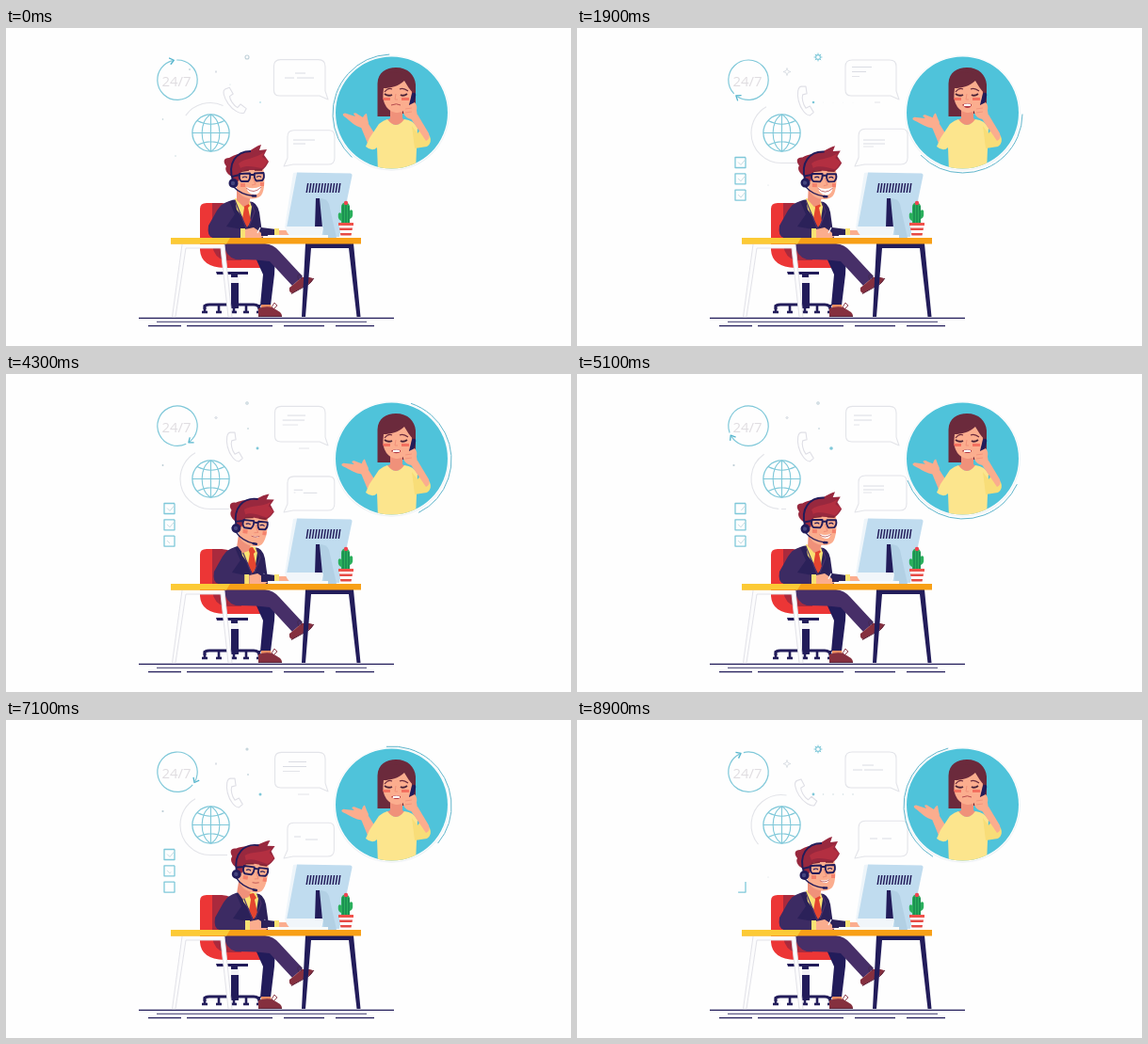
Recreate the animation shown at these times as an HTML page with a canvas. Size 600 by 338 pixels, loop 9000 ms.

```html
<!DOCTYPE html>
<html lang="en">
<head>
<meta charset="utf-8">
<title>Support desk</title>
<style>
html, body { margin: 0; width: 100%; height: 100%; overflow: hidden; background: #fefefe; }
canvas { display: block; width: 600px; height: 338px; }
</style>
</head>
<body>
<canvas id="stage" width="600" height="338"></canvas>
<script>
const ctx = document.getElementById('stage').getContext('2d');
const CYCLE = 3000, STEP = 100, TAU = Math.PI * 2;
const NAVY = '#221c5a', SUIT = '#2b2159', PANTS = '#472f68', CYAN = '#7fc8d9', GREY = '#e3e4e9';
const SKIN = '#fbad8e', SHADE = '#f0917a', RED = '#ec3636', WINE = '#aa2a3d', HAIR = '#98283e', BROWN = '#6b2a3c', YELLOW = '#fce58d';
const TIMES = [0, 500, 1100, 1900, 2100, 2900, CYCLE];
let p = 0;

const rad = deg => deg * Math.PI / 180;
const clamp = v => Math.max(0, Math.min(1, v));

// one value per key time, wrapping at the end of the cycle
function pose(...v) {
  let i = 0;
  while (p >= TIMES[i + 1]) i++;
  const k = (p - TIMES[i]) / (TIMES[i + 1] - TIMES[i]);
  const s = k * k * (3 - 2 * k);
  return v[i] + (v[(i + 1) % 6] - v[i]) * s;
}

function fill(d, color) {
  ctx.fillStyle = color;
  ctx.fill(new Path2D(d));
}

function line(d, color, width = 1, cap = 'butt') {
  ctx.strokeStyle = color;
  ctx.lineWidth = width;
  ctx.lineCap = cap;
  ctx.lineJoin = 'round';
  ctx.stroke(new Path2D(d));
}

function trim(d, len, a, b, color, width) {
  if (b <= a) return;
  ctx.setLineDash([0, a * len, (b - a) * len, len * 2]);
  line(d, color, width);
  ctx.setLineDash([]);
}

function disc(x, y, r, color) {
  ctx.beginPath();
  ctx.arc(x, y, r, 0, TAU);
  ctx.fillStyle = color;
  ctx.fill();
}

function arc(x, y, r, a, b, color, width) {
  ctx.beginPath();
  ctx.arc(x, y, r, rad(a), rad(b));
  ctx.strokeStyle = color;
  ctx.lineWidth = width;
  ctx.lineCap = 'butt';
  ctx.stroke();
}

function group(x, y, angle, scale, draw) {
  ctx.save();
  ctx.translate(x, y);
  ctx.rotate(angle);
  ctx.scale(scale, scale);
  draw();
  ctx.restore();
}

function rays(x, y, n, r0, r1, color) {
  for (let i = 0; i < n; i++) {
    const a = TAU * i / n, c = Math.cos(a), s = Math.sin(a);
    line(`M${x + c * r0} ${y + s * r0}L${x + c * r1} ${y + s * r1}`, color, 1);
  }
}

function clock() {
  const a = 256 + p * 0.12;
  arc(182, 55.2, 21.2, a + 12, a + 360, CYAN, 1.2);
  group(182 + 21.2 * Math.cos(rad(a)), 55.2 + 21.2 * Math.sin(rad(a)), rad(a + 90), 1, () =>
    line('M-3 -3.5L1.5 0L-3 3.5', '#55b5cd', 1.3));
  ctx.fillStyle = '#e0dde1';
  ctx.font = '400 15px "Open Sans", "Noto Sans", sans-serif';
  ctx.textAlign = 'center';
  ctx.fillText('24/7', 181, 61.5);
}

function globe() {
  const tail = pose(0, 22, 18, 30, 5, 0);
  arc(217, 111.5, 32, pose(215, 90, 90, 90, 95, 140), pose(295, 300, 240, 240, 235, 280), GREY, 1.1);
  if (tail > 0.5) line(`M217 143.5h${tail}`, GREY, 1.1);
  arc(217.5, 111.5, 19.6, 0, 360, CYAN, 1.3);
  line('M217.5 92V131M198 111.5H237M203 98.5Q217.5 106 232 98.5M203 124.5Q217.5 117 232 124.5', CYAN, 1.1);
  line('M217.5 92C205 98 205 125 217.5 131C230 125 230 98 217.5 92', CYAN, 1.1);
}

function handset() {
  group(243, 77.5, pose(-0.38, 0, 0, 0, 0, -0.33), 1.1, () =>
    line('M-4 -14C-8 -14 -8.5 -7 -7 0C-5 8 0 14 4 14L7.5 11L4 5L0 7C-3 3 -4 -3 -3 -6L1 -7L0 -14Z', '#dfdfe6', 1));
}

function boxes() {
  for (let i = 0; i < 3; i++) {
    const y = 137.5 + i * 17.3, late = p < 60 ? p + CYCLE : p;
    const on = late > CYCLE ? 1 : clamp((p - 100 - i * 250) / 400);
    const off = clamp((late - 2250 - i * 225) / 350);
    if (p < 60 && off >= 1) continue;
    trim(`M179 ${y}H168V${y + 11}H179V${y}`, 44, off, on, CYAN, 1.3);
    const tick = clamp((p - 700 - i * 250) / 300), gone = clamp((p - 2000 - i * 150) / 250);
    trim(`M171 ${y + 5}l3 3l5 -6`, 12, gone, tick, '#c5dce2', 1);
  }
}

function bubbles() {
  group(341, 75, 0, pose(1.01, 0.9, 0.99, 1, 0.99, 1), () => {
    line('M-8 -3H-50Q-56 -3 -56 -9V-34Q-56 -41 -49 -41H-9Q-2 -41 -2 -34V-8L1 1Z', GREY, 1.1);
  });
  const x = pose(296, 297, 294, 292, 294, 293), y = pose(48, 47, 44.5, 41.5, 44, 48);
  const split = pose(11, 0, 6, 0, 0, 10);
  const gap = pose(3, 0, 0, 0, 0, 2);
  line(`M${x + split} ${y}h${pose(11, 24, 19, 21, 19, 12)}`, '#dadce3');
  line(`M${x} ${y + 5}h10m${gap} 0h${pose(18, 5, 15, 5, 9, 20)}`, '#dadce3');
  line(`M${x} ${y + 10}h${pose(0, 9, 18, 8, 6, 0)}`, GREY);
  const under = pose(0, 0, 12, 6, 0, 0);
  if (under > 0.3) line(`M${322 - under} 79h${under}`, GREY);

  group(296, 147, 0, pose(0.98, 1.07, 0.97, 1.02, 1, 1.02), () => {
    line('M3 -9V-32Q3 -39 10 -39H48Q54 -39 54 -33V-9Q54 -2 47 -2H9L-1 0Z', GREY, 1.1);
  });
  const bx = pose(305, 304, 306, 304, 304, 311);
  line(`M${bx} ${pose(119, 117, 124, 119, 119, 126)}h${pose(23, 24, 7, 23, 22, 8)}`, '#dadce3');
  line(`M${bx + pose(0, 0, 12, 0, 0, 13)} ${pose(123, 121, 127, 123, 123, 126)}h${pose(13, 24, 13, 23, 22, 10)}`, '#dadce3');
  line(`M${bx} 126h${pose(0, 11, 0, 11, 9, 0)}`, GREY);
}

function sparks() {
  const s = pose(1, 4, 1, 4, 1.4, 4), q = s / 4;
  line(`M223 ${46.5 - s}l${q} ${s - q}l${s - q} ${q}l${q - s} ${q}l${-q} ${s - q}l${-q} ${q - s}l${q - s} ${-q}l${s - q} ${-q}Z`, '#d3d9e0', 0.8);
  const g = pose(0.2, 0, 0.1, 1, 0.2, 1);
  arc(256, 31, pose(2, 0.8, 1, 2.4, 1.2, 2.4), 0, 360, g > 0.5 ? CYAN : '#bfd0d8', 1.1);
  if (g > 0.3) rays(256, 31, 8, 2.6, 2.6 + 1.8 * g, CYAN);
  disc(pose(270, 270, 270, 251, 270, 251), 79, pose(0.7, 1.2, 1.5, 1.3, 1.8, 1.4), CYAN);
  disc(166.5, 97, pose(0.8, 0.6, 1.1, 0, 1.1, 0), '#bccdd5');
  const k = pose(0, 2.6, 1, 0, 0.8, 0);
  if (k > 0.2) rays(257, 58, 4, 0, k, '#c9d8df');
  const b = pose(0, 1, 0, 0.2, 0, 0.2);
  if (b > 0.3) rays(203, 168, 8, 2.2 * b, 4.5 * b, CYAN);
  else disc(203, 167, b * 3, '#d5dee3');
  disc(195, 44, pose(1.1, 0, 0, 0, 0, 0), '#cbdce2');
  disc(180, 136, pose(0.8, 0, 0, 0, 0, 0), '#cbdce2');
  disc(238, 60, pose(0.6, 1, 0, 0, 0, 0), '#cbdce2');
  const dots = pose(0, 0, 0, 0.4, 0, 1);
  for (let i = 1; i < 5; i++) disc(251 + i * 10.5, 79, 0.8 * dots, '#d2dde2');
}

function woman() {
  const a = 132.5 + p * 0.12;
  disc(409.5, 90.5, 61.2, '#eef1f4');
  disc(409.5, 90, 60.6, '#fefefe');
  disc(409.5, 90, 59.5, '#4fc3da');
  arc(410, 91, 63, a, a + 135, '#62b6cc', 1);
  ctx.save();
  ctx.beginPath();
  ctx.arc(409.5, 90, 59.5, 0, TAU);
  ctx.clip();
  fill('M394.5 94V59C395 47 404 42 414 42C427 42 434 50 435 60V91H420V94Z', BROWN);
  fill('M408 82H421V96L424 98Q414 108 404 98L408 96Z', SHADE);
  fill('M376 103L383 99L397 121L392 128L385 125Z', SKIN);
  group(380, 101, pose(0, -0.25, -0.2, -0.2, -0.18, 0), 1, () =>
    fill('M-3 5C-10 3 -14 -2 -21 -7Q-24 -10 -20 -10.5L-9 -7L-11 -10Q-9 -12 -6 -9L-1 -6Q1 -10 3 -10L4 -4L5 0L3 5Z', SKIN));
  fill('M396 102Q401 98 405 97Q414 109 423 97Q433 98 437 106L435 152H395L394 127Q389 132 382 126L386 117Z', YELLOW);
  fill('M431 104L437 112L441 107L450 115Q453 122 447 126L434 128Z', '#f8dd78');
  fill('M400 62C401 55 407 52 414 52C423 52 431 57 431 67C431 81 426 89 416 90C405 90 400 80 400 69Z', SKIN);
  fill('M395 75V58C399 45 424 42 434 59L433 70C429 66 426 61 423 56C417 62 408 64 401 64L400 76Z', BROWN);
  line('M402 68Q406 63 410 65M418 65Q422 63 427 67', BROWN, 1.2);
  line('M402 70Q406 73 410 71M419 71Q422 73 426 70', '#4b2437', 1.9);
  fill('M400 74H408V77H401ZM420 74H428V77H420Z', '#f4705f');
  line('M414 70L413 76H416', SHADE, 1);
  const m = pose(0.2, 0.5, 0.7, 1, 0.7, 0.2);
  line('M409 82Q415 79.5 419 82', '#b54b4f', 1);
  if (m > 0.35) {
    fill(`M410 81Q415 79.5 419 81Q419 ${82 + 3 * m} 414.5 ${82 + 3 * m}Q411 ${82 + 3 * m} 410 81Z`, '#b23c47');
    fill('M411 81Q415 80 418 81V83H411Z', '#fff');
  }
  line('M433 71L430 83', NAVY, 4.5, 'round');
  fill('M429 95L437 92L449 112Q451 118 446 120Z', SKIN);
  fill('M422 84Q424 81 428 82L434 79Q437 82 436 88L437 94L431 97Q424 96 422 90Z', SKIN);
  line('M424 86L431 85M424 90L431 89', SHADE, 0.8);
  ctx.restore();
}

function chair() {
  fill('M206 192Q206 186 213 186H227Q234 187 234 193V231H206Z', RED);
  fill('M219 186H229Q241 187 242 193V231H219Z', WINE);
  fill('M206 229H237V246H271Q277 247 276.5 251Q276 255 271 255H232Q207 254 206 236Z', RED);
  fill('M219 231H250V247H232Q221 244 219 231Z', WINE);
  fill('M223 259H257V262H246V265H239V262H224Z', NAVY);
  fill('M239 265H247V272H239Z', '#f3f2f6');
  fill('M239 271H247V298H239Z', NAVY);
  line('M211 299V296Q211 294 216 294H263Q269 294 269 299', NAVY, 3);
  for (const x of [211, 226, 242, 255, 269]) {
    line(`M${x} 294V302`, NAVY, 2.6);
    line(`M${x - 3} 302H${x + 3}`, NAVY, 2.6);
  }
}

function legs() {
  fill('M264 242H286L285 262L281 295H270L273 262Z', NAVY);
  fill('M271 294H281L282 298H271Z', '#eb8c61');
  fill('M268 306V298Q276 295 283 297L291 302Q293 304 293 306Z', '#85303f');
  line('M268 306.5H293', '#5a2038', 1);
  line('M282 297l3 -5l3 3l-4 4', '#85303f', 0.9);
  fill('M231 229H275Q284 230 290 237L315 264L304 274L280 248Q268 246 244 246Q233 243 231 229Z', PANTS);
  fill('M304 274L312 267L315 271L306 277Z', '#eb8c61');
  fill('M301 276Q307 272 314 265Q321 264 326 266Q326 270 321 272L304 282Q300 281 301 276Z', '#85303f');
  line('M303 282.5L322 272L327 266', '#5a2038', 1);
  line('M311 268q-3 -6 1 -6q3 1 1 5', '#43284d', 0.9);
}

function torso() {
  ctx.save();
  ctx.translate(pose(0, 7, 7, 0, 0, 0), 0);
  fill('M237 184Q243 181 250 183L262 185Q269 188 270 203L273 224H219L226 205Z', SUIT);
  fill('M243 181L259 184L261 190L258 210L245 193Z', '#fae273');
  fill('M251 185L256 184L259 189L257 191L260 205L256 212L251 203L253 191Z', '#e5452f');
  line('M243 183L252 205L256 215M260 185L264 195L258 211', '#49316a', 1.2);
  ctx.restore();
  const h = pose(0, 5, 5, 0, 0, 0), e = pose(0, 7, 7, 0, 0, 0);
  fill(`M${237 + e} 184Q${229 + e} 186 ${224 + e} 194L${215 + e} 210Q${213 + e} 222 ${220 + e} 223L${250 + h} 223V214L${234 + e} 211L${243 + e} 198Z`, '#3c2b63');
  fill(`M${249 + h} 213H${254 + h}V223H${249 + h}Z`, '#fae273');
  fill(`M${254 + h} 214L${263 + h} 212L${269 + h} 216L${274 + h} 221L${271 + h} 223H${254 + h}Z`, SKIN);
  line(`M${267 + h} 218L${270 + h} 212`, '#f6f6fa', 1.3);
  fill('M271 212L287 214V221H271Z', SUIT);
  fill('M285 213H290V221H285Z', '#fae273');
  fill('M290 215L298 215L303 220H290Z', SKIN);
}

function head() {
  group(250, 185, pose(0, 0.16, 0.16, 0.05, 0.05, 0), 1, () => {
    ctx.translate(-250, -185);
    fill('M245 171L260 178L258 187L252 190L245 183Z', SHADE);
    fill('M243 147L273 148C275 160 275 172 271 178C266 183 256 182 250 178C244 173 242 160 243 147Z', SKIN);
    fill('M240 158C234 155 232 150 234 147C230 142 231 138 237 138C243 134 252 133 258 131C263 128 267 125 271 124L269 130L277 129L274 135L279 142C277 146 275 149 272 151C266 152 257 150 250 152L247 163L241 162Z', HAIR);
    fill('M247 144C254 138 265 139 274 132L272 137L278 141C276 145 275 147 272 149C264 148 256 145 249 149Z', '#b32f41');
    line('M249 152.5L258 151M264 151L272 151', '#7e2433', 1.5);
    line('M248 155L259 154.5Q260 160 257 163L250 163Q247 161 248 155ZM264 154.5L273.5 154Q275 159 272 162L266 162.5Q263 160 264 154.5ZM259 156H264M248 156L240 158', NAVY, 1.9);
    line('M251 159Q254 157 256 159M266 158.5Q269 156.5 271 158.5', NAVY, 1.2);
    line('M262 159L265 166L261 167', SHADE, 1.2);
    fill('M249 165H254V169H249ZM270 164H274V168H270Z', '#f4826c');
    const m = pose(1, 0.35, 0, 1, 0.55, 0.35), w = 3.5 + 4.5 * m, low = 171 + 6 * m;
    if (m > 0.12) {
      fill(`M${263 - w} ${170 - m}Q263 172 ${263 + w} ${169 - m}Q${262 + w} ${low} 264 ${low}Q${265 - w} ${low} ${263 - w} ${170 - m}Z`, '#fff');
    }
    line(`M${263 - w} ${171 - m}Q263 ${171.5 + 6 * m} ${263 + w} ${170 - m}`, '#b84c4d', 0.8);
    line('M241 162C235 144 244 131 260 131', NAVY, 1.9);
    disc(241.5, 165, 5, NAVY);
    disc(241, 165, 2.2, '#45457f');
    line('M242 169Q249 177 263 178.5', NAVY, 1.4);
    line('M262 178.5H265', NAVY, 2.6, 'round');
  });
}

function computer() {
  fill('M305 154L309 153.5L300 212H296Z', '#eef5fa');
  fill('M309 153.5L366 154.5Q368 155 367.5 157L354 222H335L337 212H298Z', '#c0dcef');
  for (let i = 0; i < 12; i++) {
    const x = 320.7 + i * 3.1;
    line(`M${x} 165L${x - 1.5} 175`, NAVY, 1.5);
  }
  fill('M333 181Q341 181 343 187L351 223H338Z', '#b2d0e4');
  fill('M329 181H333L336 212H328Z', NAVY);
  fill('M296 211H336Q337 220 330 223H304Q298 219 296 211Z', '#f1f6fa');
  fill('M278 220H342V223H278Z', '#f8fafc');
}

function cactus() {
  line('M360.5 190V208', '#2bb05d', 9, 'round');
  line('M354.5 198V201Q355 204 360 204M366.5 195V199Q366 202 361 202', '#2bb05d', 3.4, 'round');
  line('M358 188V207M361 187V207M364 189V207', '#127a4b', 1.1);
  disc(361, 186, 2.2, '#ed4551');
  fill('M353 207H369V210H353Z', '#f0524b');
  fill('M354 210H368L366 223H356Z', '#fff');
  fill('M354 212.5H368L367.6 215H354.4ZM355 218H367L366.6 220.5H355.4Z', '#e64a45');
}

function desk() {
  fill('M187 230H232L240 307H236L228 234H191L180 307H176Z', '#fcfcfd');
  line('M187 230L176.5 307H180L191 234H228L236 307H240L232 230', '#dfdfe6', 0.9);
  fill('M318 229H369L376.5 307H372.5L364 234H324L318 307H314Z', NAVY);
  fill('M175 223H377V229.5H175Z', '#f8a017');
  fill('M175 223H238L234 229.5H175Z', '#fcca35');
}

function ground() {
  line('M141 308.4H412', NAVY, 1.1);
  line('M160 312.3H383', NAVY, 0.9);
  line('M151 316.6H186M192 316.6H283M295 316.6H338M350 316.6H391', NAVY, 1.1);
}

function frame(now) {
  p = Math.floor(now / STEP) * STEP % CYCLE;
  ctx.fillStyle = '#fefefe';
  ctx.fillRect(0, 0, 600, 338);
  [clock, globe, handset, boxes, bubbles, sparks, woman, ground, chair, legs,
    torso, head, computer, cactus, desk].forEach(draw => draw());
}

const start = performance.now();
function tick() {
  frame(performance.now() - start);
  requestAnimationFrame(tick);
}
tick();
</script>
</body>
</html>
```
